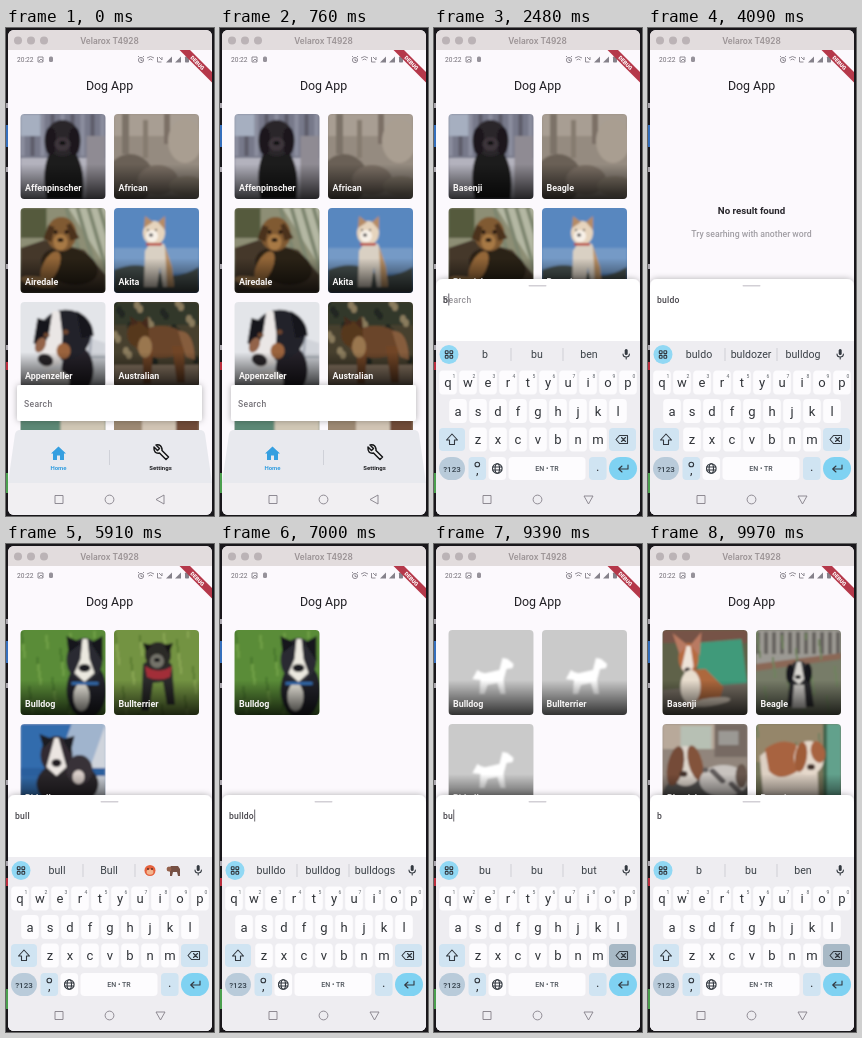
Recreate the animation shown at these times as an HTML page. Size 208 px wide and 488 px high, loop 10000 ms.

```html
<!DOCTYPE html>
<html lang="en">
<head>
<meta charset="utf-8">
<title>Dog App</title>
<style>
html, body { margin: 0; width: 100%; height: 100%; overflow: hidden; background: #19171b; }
svg { display: block; width: 208px; height: 488px; }
text { font-family: Roboto, sans-serif; }
.mid { text-anchor: middle; }
.line { fill: none; stroke: #333940; stroke-width: 1.1; stroke-linecap: round; stroke-linejoin: round; }
.thin { fill: none; stroke: #85818a; stroke-width: .9; }
.label { font-size: 8.9px; font-weight: 700; fill: #f6f4f4; }
.key { font-size: 13px; fill: #303338; }
.word { font-size: 10.6px; fill: #3c4248; }
.hint { font-size: 8.6px; font-weight: 500; letter-spacing: .3px; fill: #77747a; }
</style>
</head>
<body>
<svg id="stage" viewBox="0 0 208 488"></svg>
<script>
const LOOP = 10000;
const R = (x, y, w, h, f, r = 0) => `<rect x="${x}" y="${y}" width="${w}" height="${h}" rx="${r}" fill="${f}"/>`;
const E = (x, y, a, b, f, turn = 0) =>
  `<ellipse cx="${x}" cy="${y}" rx="${a}" ry="${b}" fill="${f}" transform="rotate(${turn} ${x} ${y})"/>`;
const P = (d, f) => `<path d="${d}" fill="${f}"/>`;
const L = (d, cls = 'line') => `<path class="${cls}" d="${d}"/>`;
const T = (x, y, s, cls, more = '') => `<text x="${x}" y="${y}" class="${cls}" ${more}>${s}</text>`;
const at = (x, y, s, id = '') => `<g ${id && `id="${id}"`} transform="translate(${x} ${y})">${s}</g>`;
const bg = f => R(-2, -2, 89, 89, f);
const many = (n, fn) => Array.from({ length: n }, (_, i) => fn(i)).join('');

// Soft flat scenes, 85 by 85.
const blades = (n, f) => many(n, i => R(i * 31 % 85, i * 47 % 85, 2, 7, f));
const pics = {
  affen: bg('#77798a') + many(9, i => R(i * 10, 0, 4, 42, i % 2 ? '#5d5c69' : '#8c8f9f')) + R(0, 0, 20, 22, '#a6afc0') +
    R(0, 44, 85, 41, '#b3b2bd') + R(66, 22, 19, 63, '#8f8b93') + P('M26 85q-6-30 4-48l24 0q12 18 8 48z', '#1e1b1f') +
    E(42, 24, 17, 18, '#2b272c') + E(30, 27, 6, 14, '#1b191d') + E(54, 27, 6, 14, '#1b191d') + E(42, 30, 8, 7, '#3c353b') + E(42, 29, 3, 2, '#09090b'),
  african: bg('#958b80') + R(0, 0, 85, 22, '#a89e93') + R(8, 0, 7, 40, '#7c7268') + R(29, 6, 5, 38, '#867b70') +
    R(50, 0, 6, 30, '#7b7066') + E(71, 27, 17, 22, '#a99e91') + E(16, 65, 24, 25, '#6a6056') + E(44, 66, 20, 15, '#7b7065') + E(73, 72, 18, 10, '#857a6c'),
  airedale: bg('#8d8e74') + P('M48 0H85V58z', '#b4b7a3') + many(5, i => P(`M${44 + i * 11} 0h4l18 62h-4z`, '#7e866f')) +
    R(0, 0, 26, 30, '#545a3d') + P('M0 40l24-8 40 10 21 25v18H0z', '#45372a') + E(49, 58, 29, 18, '#292119', 15) +
    E(41, 26, 15, 17, '#805a33') + P('M28 17l-5 14 8 3 3-15zM50 15l9 15-9 3-4-16z', '#4b321f') +
    E(40, 34, 7, 8, '#a77945') + E(40, 32, 3, 2, '#15100d') + E(35, 24, 2, 2, '#17110c') + E(46, 24, 2, 2, '#17110c') +
    E(30, 59, 8, 17, '#936638', 25) + E(18, 74, 18, 5, '#a0794c', 10),
  akita: bg('#5987bf') + R(0, 40, 85, 25, '#759ac6') + P('M0 62Q24 52 42 63T85 59V85H0z', '#46514f') +
    P('M30 79l1-36 7-11 12 4 8 23 2 20H49l-3-20-3 20z', '#d9d0c3') + P('M51 38l7 21 2 20h-7z', '#ba9165') + E(40, 25, 11, 12, '#e6d4bd') +
    P('M30 20l1-12 8 6zM44 14l7-6 0 14z', '#b58b66') + E(38, 28, 6, 6, '#f8f1e8') + E(37, 27, 2, 1.6, '#24242a') +
    E(34, 22, 1, 1, '#24242a') + E(42, 22, 1, 1, '#24242a') + R(32, 35, 16, 2.5, '#b83b34', 1),
  appen: bg('#e3e5e9') + P('M47 85L66 35l19 6v44z', '#d1d4da') + P('M62 85l8-50h2l-4 50zM62 54h23v2H62z', '#a6abb5') +
    E(57, 68, 16, 24, '#25242a') + E(44, 33, 27, 25, '#24242b', -25) + P('M17 16l-4 25 8 5 13-25zM56 9q17 8 17 25l-12 2z', '#16161b') +
    P('M32 9h7l3 24-2 29-16 5-7-11 11-22z', '#eae6e5') + E(20, 43, 5, 8, '#93644a', 25) + E(43, 49, 7, 8, '#9b643e') +
    E(25, 58, 8, 6, '#292529', 20) + E(26, 33, 3, 2.5, '#6c452f') + E(45, 30, 3, 2.5, '#6c452f') + E(35, 80, 14, 12, '#ede9e6'),
  aussie: bg('#46402f') + R(0, 0, 85, 23, '#33382a') + many(32, i => E(i * 37 % 85, i * 23 % 62, 3, 4, i % 2 ? '#8a7c5d' : '#242820')) +
    R(0, 63, 85, 22, '#8d7a66') + E(47, 40, 27, 16, '#6b452b') + E(24, 32, 11, 13, '#57371f') + P('M17 24l-1-10 9 7zM27 21l7-7 1 14z', '#452a1b') +
    P('M29 46h10l-2 36h-8zM58 44h12l1 37h-8z', '#714528') + P('M64 29q16-2 17 29l-9-3z', '#865d3c') + E(31, 45, 7, 11, '#9a7750'),
  bluish: bg('#75877b') + R(0, 20, 40, 65, '#5b8874') + R(40, 20, 45, 20, '#d0c7b5'),
  brown: bg('#9d8973') + R(28, 20, 34, 40, '#d1c4b4') + R(62, 20, 23, 60, '#704c39'),
  bulldog: bg('#5a8c37') + blades(42, '#75a34a') + blades(17, '#416f28') + E(66, 60, 20, 29, '#22232a') +
    E(64, 30, 18, 22, '#292a30') + P('M48 23l-2-17 15 7zM70 13l12-7v25z', '#18191f') +
    P('M62 9h5l2 20 5 14-10 9-10-9 6-14z', '#ebe8df') + E(64, 38, 6, 4, '#1e1c20') + E(61, 67, 8, 14, '#e9e6dc') + R(51, 52, 27, 3, '#356db0'),
  terrier: bg('#739342') + blades(48, '#8aa754') + blades(22, '#587b33') + P('M29 34q17-13 29 1l3 40h-8l-4-23-10 1-4 28h-8z', '#292a2b') +
    E(44, 25, 13, 13, '#2c2927') + P('M32 22l-3-9 9 2zM50 15l9-2-4 11z', '#171719') + E(43, 31, 7, 7, '#75736b') +
    E(43, 30, 3, 2, '#0f1013') + P('M31 36q14 9 27 0l-2 11q-11 5-23 0z', '#a22e38'),
  pitbull: bg('#a0b4cd') + P('M0 0H51L20 85H0z', '#326cad') + P('M85 0L55 85h30z', '#cfd4dc') + R(0, 44, 85, 8, '#2c5f9d') +
    E(47, 60, 31, 23, '#2c272a') + E(36, 31, 16, 19, '#302c30') + P('M23 24l-4-14 13 5zM42 15l12-3-4 17z', '#1c1b20') +
    P('M34 14h4l8 29-10 9-10-9z', '#ebe5e1') + E(36, 39, 5, 4, '#211d22') + E(59, 46, 13, 15, '#373137') + E(58, 53, 6, 7, '#d7ccc7'),
  basenji: bg('#5f6249') + R(0, 0, 85, 13, '#765246') + P('M32 13L79 9l6 47-46 15z', '#409a7a') + P('M0 60L85 53V85H0z', '#766e64') +
    P('M25 40l18-1 18 18-5 17-31 2z', '#ad673e') + E(26, 28, 10, 15, '#b76a40') + P('M17 24L10 3l15 12zM28 15L39 2l-2 24z', '#b97a62') +
    P('M24 16h4l3 20-5 12-7-10z', '#eee3d8') + E(25, 40, 3, 2.5, '#292021') + E(28, 57, 10, 17, '#e8ddce') + E(48, 72, 20, 4, '#ddd0c0', -8),
  beagle: bg('#777b67') + P('M0 0H85V27L0 36z', '#9b9993') + many(11, i => R(i * 8, 2, 4, 22, '#66635f')) +
    P('M0 34L85 23v6L0 41z', '#8b6756') + blades(35, '#70835d') + P('M34 48h20l4 29H31z', '#292a2e') +
    E(43, 42, 10, 11, '#303034') + E(34, 44, 4, 10, '#18191d') + E(52, 43, 4, 10, '#18191d') +
    P('M41 32h4l3 17-5 6-6-6z', '#d8d5d0') + E(42, 47, 3, 2, '#151518') + P('M38 55h10l2 23H36z', '#cfccc8'),
  spaniel: bg('#91857b') + R(0, 0, 85, 25, '#b8a99a') + R(18, 2, 31, 23, '#b7c0b4') + R(52, 0, 33, 33, '#776b63') + R(56, 7, 20, 14, '#9b9994') +
    E(44, 75, 45, 30, '#575453') + E(23, 42, 17, 20, '#ddd5cc') + E(13, 42, 8, 20, '#744c38', 12) +
    E(33, 39, 7, 18, '#83533b', -15) + E(21, 50, 4, 3, '#42312c') + E(61, 57, 24, 16, '#c8c3bf') +
    many(12, i => E(43 + i * 17 % 36, 46 + i * 11 % 24, 3, 2.5, '#615b5b')) + E(79, 52, 6, 12, '#68564d'),
  beige: bg('#76745a') + R(0, 0, 70, 38, '#95866b') + blades(20, '#718161') + R(70, 0, 15, 85, '#62a18c') + R(67, 0, 4, 85, '#42664f') +
    P('M4 32q15-15 38-10l19 11 2 52H8z', '#ddd0c3') + P('M9 25q15-12 31-5l4 25q-19 15-31 2z', '#a86440') +
    E(53, 34, 15, 17, '#e5d8cb') + E(45, 33, 6, 15, '#9f5b39', 8) + E(62, 28, 7, 11, '#a86440', -15) + E(55, 43, 4, 3, '#42302b'),
  blank: bg('#cacaca') +
    P('M24 49l5-9q4 4 9 3l13-3 3-12 5 1 6 5-1 4-6 1-3 11 2 14h-5l-3-11-10 2-3 9h-5l1-14z', '#fff')
};

const ALL = ['Affenpinscher', 'African', 'Airedale', 'Akita', 'Appenzeller', 'Australian', '', ''];
const B = ['Basenji', 'Beagle', 'Bluetick', 'Borzoi'];
const BU = ['Bulldog', 'Bullterrier', 'Pitbull'];
const ONE = ['Bulldog'];
const first = ['affen', 'african', 'airedale', 'akita', 'appen', 'aussie', 'bluish', 'brown'];
const bulls = ['bulldog', 'terrier', 'pitbull'];
const hounds = ['basenji', 'beagle', 'spaniel', 'beige'];
const blank = Array(4).fill('blank');

// time, typed text, names, pictures
const steps = [
  [0, '', ALL, first], [2440, 'b', B, first], [2740, 'b', B, hounds],
  [2860, 'bu', BU, hounds], [3080, 'bul', BU, bulls], [3300, 'buld', [], []], [3540, 'buldo', [], []],
  [4420, 'buld', [], []], [4640, 'bul', BU, blank], [5120, 'bull', BU, blank], [5400, 'bull', BU, bulls],
  [6400, 'bulld', ONE, bulls], [6800, 'bulldo', ONE, bulls], [7250, 'bulldog', ONE, bulls],
  [8200, 'bulldo', ONE, bulls], [8500, 'bulld', ONE, blank], [8850, 'bull', BU, blank],
  [9000, 'bul', BU, blank], [9150, 'bu', BU, blank], [9400, 'b', B, blank], [9620, 'b', B, hounds]
];
const keySteps = steps.filter((s, i) => i && s[1] !== steps[i - 1][1]);
const keyTimes = keySteps.map(s => s[0]);
const eraseTimes = keySteps.filter((s, i) => i && s[1].length < keySteps[i - 1][1].length).map(s => s[0]);
const words = {
  b: ['b', 'bu', 'ben'], bu: ['bu', 'bu', 'but'], bul: ['bul', 'bull', 'bulk'], buld: ['buld', 'build', 'bulldog'],
  buldo: ['buldo', 'buldozer', 'bulldog'], bull: ['bull', 'Bull'], bulld: ['bulld', 'bulldog', 'bulldogs'],
  bulldo: ['bulldo', 'bulldog', 'bulldogs'], bulldog: ['bulldog', 'bulldogs', 'Bulldog']
};

const card = (name, pic, i) => at(i % 2 ? 108 : 14.5, 86 + (i >> 1) * 94,
  `<g clip-path="url(#tile)"><g filter="url(#soft)">${pics[pic]}</g>${R(0, 50, 85, 35, 'url(#shade)')}</g>` + T(4.5, 77, name, 'label'));
const grid = (names, list) => names.length ? names.map((n, i) => card(n, list[i], i)).join('') :
  T(103.5, 185.5, 'No result found', 'mid', 'font-size="9.7" font-weight="700" fill="#28262b"') +
  T(103.5, 208.5, 'Try searhing with another word', 'mid', 'font-size="8.7" font-weight="500" fill="#a19ea4"');

const tools = L('M45 322v9M43.500 322h3M43.500 331h3M41 325l-2 1.500 2 1.500M49 325l2 1.500-2 1.500') +
  L('M70 322h8v9h-8zM74 326l4 5') + P('M74 326h4v5z', '#333940') +
  L('M99 322h9v7l-3 3h-6zM101.500 327q2 3 4 0M101.500 325h0M105.500 325h0') +
  T(132.500, 329.500, 'GIF', 'mid', 'font-size="8" font-weight="700" fill="#333940"') +
  E(162, 326.5, 5, 5, '#333940') + many(4, i => E(158.8 + i * 2, i % 3 ? 323.6 : 325.6, .8, .8, '#eef0f7')) + E(165, 330, 2, 1.5, '#eef0f7');
const emojis = E(144, 326.5, 5.5, 5.5, '#e5613d') + E(144, 328, 3.4, 2.7, '#f3b58f') +
  E(142, 325, .9, .9, '#542c25') + E(146, 325, .9, .9, '#542c25') +
  P('M162 325l3-3h7l2 3v7h-2l-1-4h-4l-1 4h-2v-4z', '#765044') + E(163, 325, 2.4, 2.5, '#94604b');
const splits = '<path d="M77 320v13M129 320v13" stroke="#cfcfd5"/>';
const strip = text => !text ? tools : splits +
  words[text].map((w, i) => T(51 + i * 52, 330, w, 'word mid')).join('') + (text === 'bull' ? emojis : '');

const letters = (row, x, y) => [...row].map((c, i) => {
  const cx = x + i * 20;
  return R(cx - 8.8, y - 12, 17.6, 24, '#fdfcfe', 4) + T(cx, y + 4.5, c, 'key mid') +
    (row.length > 9 ? T(cx + 6, y - 5, (i + 1) % 10, 'mid', 'font-size="5" fill="#5e6369"') : '');
}).join('');
const keyboard = R(2, 313, 204, 240, '#eeedf1') + E(15, 326.5, 9.5, 9.5, '#91d8f4') +
  many(4, i => `<rect class="line" x="${11.3 + i % 2 * 4.6}" y="${322.8 + (i >> 1) * 4.6}" width="2.8" height="2.8" rx=".7"/>`) +
  '<g id="strip"></g>' + R(190.700, 321, 3, 6, '#333940', 1.500) + L('M189 326q0 3 3.200 3t3.200-3M192.200 329v2') +
  letters('qwertyuiop', 14, 354.5) + letters('asdfghjkl', 24, 383) + letters('zxcvbnm', 44, 411.5) +
  R(5, 400, 26, 23, '#d0e4f2', 4) + L('M18 406l-5.500 6h3v4.500h5V412h3z') +
  `<rect id="del" x="175" y="400" width="27" height="23" rx="4"/>` + L('M185.500 407.500h8v8h-8l-3.500-4zM187.500 409.500l4 4M191.500 409.500l-4 4') +
  R(5, 429, 26, 23, '#b9cbda', 11.5) + T(18, 443.5, '?123', 'mid', 'font-size="8" font-weight="500" fill="#34414c"') +
  R(34.500, 429, 17.600, 23, '#d0e4f2', 4) + `<circle class="line" cx="43.300" cy="436.500" r="2.300"/>` + T(43.300, 446, ',', 'key mid') +
  R(54.500, 429, 17.600, 23, '#fdfcfe', 4) + `<circle class="line" cx="63.300" cy="440.500" r="4.800"/><ellipse class="line" cx="63.300" cy="440.500" rx="2.200" ry="4.800"/>` +
  L('M58.800 439h9M58.800 442h9') + R(74.500, 429, 77, 23, '#fdfcfe', 4) +
  T(113, 443, 'EN • TR', 'mid', 'font-size="7" font-weight="500" fill="#4d535a"') +
  R(155, 429, 17.600, 23, '#d0e4f2', 4) + T(163.800, 443, '.', 'key mid') + R(175, 429, 28, 23, '#7fd2f2', 11.5) + L('M194 437v4h-9M188 438l-3.300 3 3.300 3');

const lights = [12, 25, 38].map(x => E(x, 12.5, 4, 4, '#bbb3b6')).join('');
const status = T(11, 34.300, '20:22', '', 'font-size="6.600" fill="#716d75"') + L('M32 29h5v5h-5zM33 33l2-2 2 2', 'thin') +
  R(43, 28.500, 4, 5.500, '#96929a', 1.500) + `<circle class="thin" cx="135" cy="32" r="2.600"/>` +
  L('M135 30.500v2h1.500M132 29l1-1M138 29l-1-1', 'thin') + L('M141 30q3.500-3 7 0M142.500 32q2-2 4 0M144.500 34h0', 'thin') +
  L('M151.500 29v5h4M153 29l3 3v-3', 'thin') + P('M160 34.500h6v-6z', '#85818a') + P('M169 34.500h6v-6z', '#85818a') + R(179, 28.500, 4, 6, '#85818a', .8);
const banner = P('M173.500 22h10.500l22 22v10.500z', '#b5384a') +
  T(0, 0, 'DEBUG', 'mid', 'font-size="5.400" font-weight="900" fill="#fff" transform="translate(191.500 34.800) rotate(45) translate(0 2)"');
const home = `<g filter="url(#drop)">${R(11, 357, 185, 36, '#fff', 3)}</g>` + T(18, 379, 'Search', 'hint') +
  P('M9 406q1-4 5-4h180q4 0 5 4l7 49H2z', '#e8e9ee') +
  P('M45 425.500l7.500-7 7.500 7h-2v6.500h-4v-4.500h-3v4.500h-4v-6.500z', '#359fe0') + T(52.500, 442, 'Home', 'mid', 'font-size="6" font-weight="700" fill="#359fe0"') +
  R(103, 422, .8, 15, '#c9cbd2') +
  `<path d="M148 419l3.500 3.500 2-2-3.500-3.500q5-1 6 4l0 1.500 6.500 6.500-2.500 2.500-6.500-6.500q-6 1-5.500-6z" fill="#eee" stroke="#161719" stroke-width="1.5" stroke-linejoin="round"/>` +
  T(154.500, 442, 'Settings', 'mid', 'font-size="6" font-weight="700" fill="#1d1e21"') + R(2, 455, 204, 33, '#f1eff2');
const sheet = `<g filter="url(#drop)"><rect x="2" y="0" width="204" height="300" rx="7" fill="#fff"/></g>` + R(94.500, 6, 18, 1.500, '#d2cfd5', .7) +
  T(9, 24, 'Search', 'hint', 'id="hint"') +
  T(9, 24, '', '', 'id="typed" font-size="8.600" font-weight="500" letter-spacing=".2" fill="#4a484e"') +
  `<rect id="caret" y="14.500" width=".9" height="12" fill="#55525a"/>`;

const stage = document.getElementById('stage');
stage.innerHTML = `<defs>
  <clipPath id="win"><rect x="2" y="2" width="204" height="485" rx="6"/></clipPath>
  <clipPath id="tile"><rect width="85" height="85" rx="4"/></clipPath>
  <linearGradient id="shade" x2="0" y2="1"><stop stop-opacity="0"/><stop offset="1" stop-opacity=".75"/></linearGradient>
  <filter id="soft" x="0" y="0" width="1" height="1"><feGaussianBlur stdDeviation="1"/></filter>
  <filter id="drop" x="-.1" y="-.3" width="1.2" height="1.6"><feDropShadow dx="0" dy="0" stdDeviation="3" flood-opacity=".3"/></filter></defs>` +
  R(0, 0, 208, 488, '#19171b') + R(0, 97, 3, 22, '#356fbc') + R(0, 334, 3, 8, '#b92d3d') + R(0, 445, 3, 20, '#4b9f4e') +
  [75, 139, 236, 317].map(y => R(0, y, 2, 5, '#aaa6ad')).join('') +
  `<g clip-path="url(#win)">${R(2, 2, 204, 485, '#fcf9fd') + R(2, 2, 204, 20, '#e2dcdd') + lights +
  T(103.500, 15.500, 'Velarox T4928', 'mid', 'style="font-family:Inter,sans-serif" font-size="8.300" font-weight="600" fill="#9a9294"') + status +
  T(103.500, 61.500, 'Dog App', 'mid', 'font-size="12.400" fill="#222025"')}
  <g id="grid"></g><g id="home">${home}</g>${at(0, 251, sheet, 'sheet') + at(0, 0, keyboard, 'keys')}
  <g class="thin" style="stroke:#85818a">${L('M49 467.500h8v8h-8z', '')}<circle cx="103.500" cy="471.500" r="4.400"/>
  <g id="back"><path d="M-4.500 0L3.500-4.500v9z"/></g></g>${banner}</g>`;

const el = Object.fromEntries([...stage.querySelectorAll('[id]')].map(n => [n.id, n]));
const OPEN = 1300, RISE = 360, HEIGHT = 173;
let shown;

function show(step) {
  const [, text, names, list] = shown = step;
  el.grid.innerHTML = grid(names, list);
  el.strip.innerHTML = strip(text);
  el.typed.textContent = text;
  el.caret.setAttribute('x', 9.3 + (text ? el.typed.getComputedTextLength() : 0));
}

function draw(t) {
  const step = steps.findLast(s => s[0] <= t);
  if (step !== shown) show(step);
  const p = Math.min(1, Math.max(0, (t - OPEN) / RISE));
  const off = HEIGHT * (1 - p) ** 1.5;
  el.sheet.setAttribute('transform', `translate(0 ${251 + off * 1.46})`);
  el.keys.setAttribute('transform', `translate(0 ${off})`);
  el.sheet.style.display = el.keys.style.display = p ? '' : 'none';
  el.home.style.display = p < 1 ? '' : 'none';
  el.back.setAttribute('transform', `translate(154.5 471.5) rotate(${-90 * p})`);
  const last = keyTimes.findLast(k => k <= t) ?? OPEN;
  el.caret.style.opacity = (t - last) % 1000 < 500 ? 1 : 0;
  el.hint.style.opacity = Math.max(0, Math.min(1, 1 - (t - keyTimes[0]) / 170));
  const erasing = t > 9930 || eraseTimes.some(k => t >= k - 60 && t < k + 30);
  el.del.setAttribute('fill', erasing ? '#a8b9c6' : '#d0e4f2');
}

const start = performance.now();
function tick() {
  draw((performance.now() - start) % LOOP);
  requestAnimationFrame(tick);
}
tick();
</script>
</body>
</html>
```
